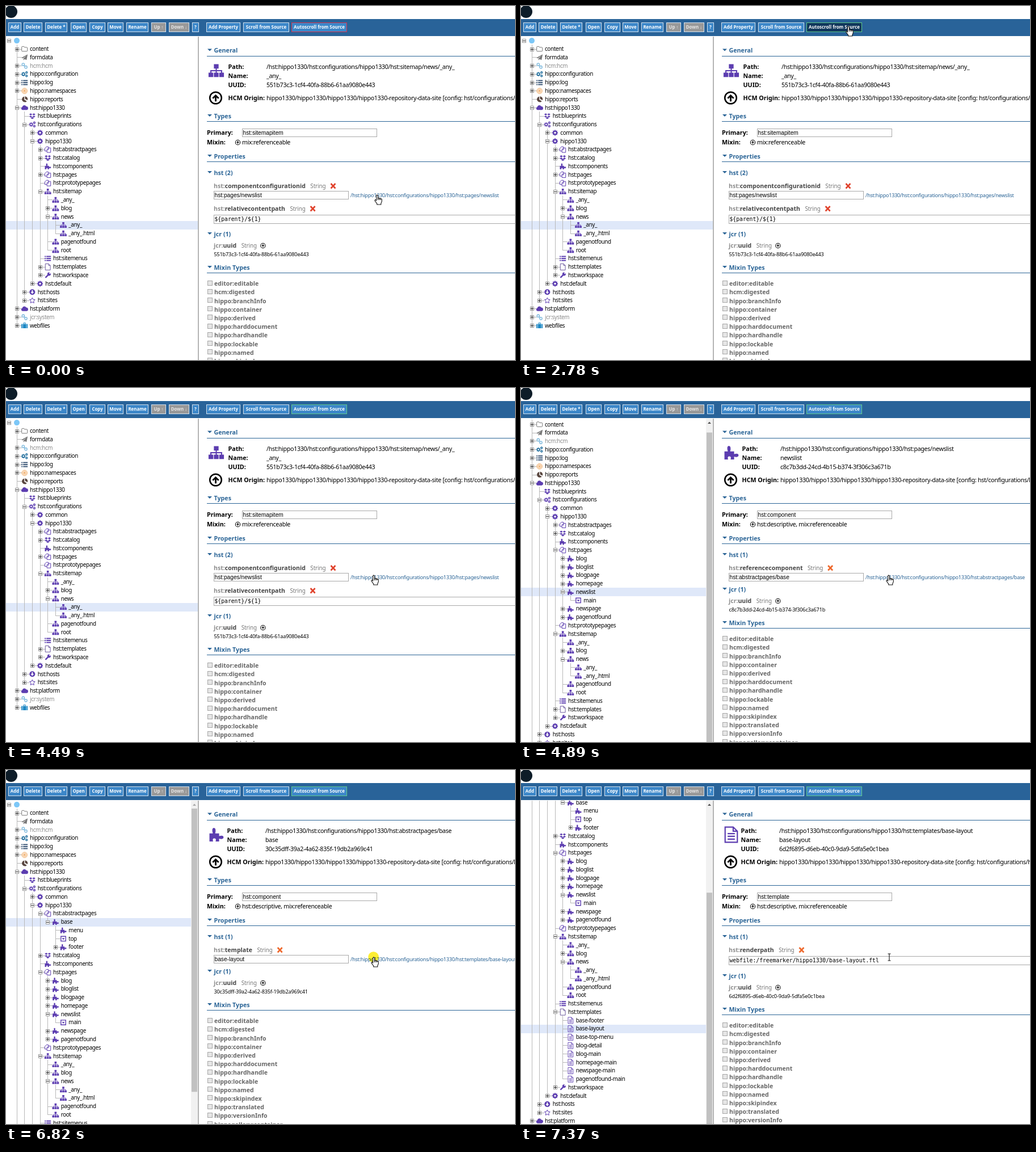
Write an HTML page with a canvas that moves like this. It is 897 by 624 pixels and loops after 8 s.

```html
<!DOCTYPE html>
<html lang="en">
<head>
<meta charset="utf-8">
<title>Repository console</title>
<style>
html, body { margin: 0; width: 100%; height: 100%; overflow: hidden; background: #fff; }
canvas { display: block; }
</style>
</head>
<body>
<canvas id="stage" width="897" height="624"></canvas>
<script>
const ctx = document.getElementById('stage').getContext('2d');
const LOOP = 8000;
const LOADS = [4720, 5960, 7060];
const NAVY = '#2a6496', PURPLE = '#5c3db0';

// [font, letter spacing]
const SANS = '"Noto Sans", "Open Sans", sans-serif';
const FONT = {
  tree: [`9.9px ${SANS}`, -.37],
  body: [`10.65px ${SANS}`, -.3],
  label: [`bold 10.7px ${SANS}`, 0],
  prop: [`bold 10.55px ${SANS}`, 0],
  type: [`9.9px ${SANS}`, -.1],
  link: [`9.1px ${SANS}`, -.25],
  uuid: [`9.1px ${SANS}`, -.16],
  button: [`bold 7.9px ${SANS}`, 0],
  input: ['10.2px "Liberation Sans", Arial, sans-serif', 0],
  mono: ['9.72px "DejaVu Sans Mono", monospace', 0]
};

const TREE = `
0 root - .
1 folder + content
1 plane . formdata
1 chain + hcm:hcm
1 cogs + hippo:configuration
1 bars + hippo:log
1 target + hippo:namespaces
1 pie . hippo:reports
1 cloud - hst:hippo1330
2 boxes . hst:blueprints
2 gears - hst:configurations
3 gear + common
3 gear - hippo1330
4 copy 2 hst:abstractpages
5 puzzle - base
6 puzzle . menu
6 caret . top
6 puzzle + footer
4 boxes + hst:catalog
4 puzzle . hst:components
4 copy 1 hst:pages
5 puzzle + blog
5 puzzle + bloglist
5 puzzle + blogpage
5 puzzle + homepage
5 puzzle - newslist
6 caret . main
5 puzzle + newspage
5 puzzle + pagenotfound
4 copy . hst:prototypepages
4 sitemap - hst:sitemap
5 sitemap . _any_
5 sitemap + blog
5 sitemap - news
6 sitemap . _any_
6 sitemap . _any_.html
5 sitemap . pagenotfound
5 sitemap . root
4 list . hst:sitemenus
4 page 3 hst:templates
5 doc . base-footer
5 doc . base-layout
5 doc . base-top-menu
5 doc . blog-detail
5 doc . blog-main
5 doc . homepage-main
5 doc . newspage-main
5 doc . pagenotfound-main
4 wrench + hst:workspace
3 gear + hst:default
2 down + hst:hosts
2 star + hst:sites
1 cloud + hst:platform
1 chain + jcr:system
1 case + webfiles`.trim().split('\n').map(line => {
  const [depth, icon, mark, name] = line.split(' ');
  return { depth: +depth, icon, mark, name };
});

const BASE = '/hst:hippo1330/hst:configurations/hippo1330/hst:';
const PANELS = [
  { icon: 'sitemap', x: 459, path: 'sitemap/news/_any_', name: '_any_', select: '6_any_',
    uuid: '551b73c3-1cf4-40fa-88b6-61aa9080e443', primary: 'sitemapitem', shift: 0, cross: '#e0432d',
    props: [['componentconfigurationid', 'hst:pages/newslist', 'pages/newslist'],
            ['relativecontentpath', '${parent}/${1}']] },
  { icon: 'puzzle', x: 457, path: 'pages/newslist', name: 'newslist', select: '5newslist',
    uuid: 'c8c7b3dd-24cd-4b15-b374-3f306c3a671b', primary: 'component', shift: -47,
    props: [['referencecomponent', 'hst:abstractpages/base', 'abstractpages/base']] },
  { icon: 'puzzle', x: 457, path: 'abstractpages/base', name: 'base', select: '5base',
    uuid: '30c35dff-39a2-4a62-835f-19db2a969c41', primary: 'component', shift: -47,
    props: [['template', 'base-layout', 'templates/base-layout']] },
  { icon: 'doc', x: 455, path: 'templates/base-layout', name: 'base-layout', select: '5base-layout',
    uuid: '6d2f6895-d6eb-40c0-9da9-5dfa5e0c1bea', primary: 'template', shift: -39,
    props: [['renderpath', 'webfile:/freemarker/hippo1330/base-layout.ftl']] }
];
const MIXINS = ['editor:editable', 'hcm:digested', ...['branchInfo', 'container', 'derived',
  'harddocument', 'hardhandle', 'lockable', 'named', 'skipindex', 'translated', 'versionInfo']
  .map(n => 'hippo:' + n), 'hippogallery:container'];

const BUTTONS = [['Add', 5, 27], ['Delete', 32, 64], ['Delete *', 70, 108], ['Open', 115, 142],
  ['Copy', 148, 175], ['Move', 180, 207], ['Rename', 213, 251], ['Up ↑', 257, 282],
  ['Down ↓', 288, 323], ['?', 329, 340], ['Add Property', 354, 413],
  ['Scroll from Source', 419, 499], ['Autoscroll from Source', 504, 601]];

const ring = (x, y, r) => `M${x - r} ${y}a${r} ${r} 0 1 0 ${2 * r} 0a${r} ${r} 0 1 0 ${-2 * r} 0`;
const cog = (x, y, r) => {
  const d = r * .7;
  return `M${x - r} ${y}h${2 * r}M${x} ${y - r}v${2 * r}M${x - d} ${y - d}l${2 * d} ${2 * d}M${x - d} ${y + d}l${2 * d} ${-2 * d}`;
};
const GEARS = [ring(-2, 0, 2.9) + ring(3.6, -3, 1.6) + ring(3.6, 3, 1.6),
  cog(-2, 0, 3.9) + cog(3.6, -3, 2.2) + cog(3.6, 3, 2.2), 1.1,
  ring(-2, 0, 1.4) + ring(3.6, -3, .8) + ring(3.6, 3, .8)];
const ROWS = 'M-5.5-4.5h2v2h-2zM-2.5-4.5h8v2h-8zM-5.5-1h2v2h-2zM-2.5-1h8v2h-8zM-5.5 2.5h2v2h-2zM-2.5 2.5h8v2h-8z';
const SHEET = 'M-4.4-5.5H1.4L4.4-2.5V5.5H-4.4ZM1.4-5.5V-2.5H4.4';

// [colour, fill, stroke, line width, cut-out]
const ICONS = {
  root: ['#7cc7f7', ring(0, 0, 5)],
  folder: ['#777', '', 'M-5-3.5Q-5-4.5-4-4.5H-1L0-3H4Q5-3 5-2V3Q5 4 4 4H-4Q-5 4-5 3Z', 1],
  plane: ['#777', 'M5.5-5.5 3.5 4.5 0 2.8-1.6 5.2-2 2 3.5-3.5-3 1.5-5.5.5Z'],
  chain: ['#7db9dd', '', ring(-2.3, -2.3, 2.2) + ring(2.3, 2.3, 2.2) + 'M-1.4-1.4 1.4 1.4', 1.4],
  cogs: ['#1d6c9c', ...GEARS],
  gears: [PURPLE, ...GEARS],
  gear: [PURPLE, ring(0, 0, 3.8), cog(0, 0, 5), 2, ring(0, 0, 1.7)],
  bars: ['#3d5878', ROWS],
  list: [PURPLE, ROWS],
  target: ['#f0a860', ring(0, 0, 1.6), ring(0, 0, 3) + ring(0, 0, 4.8), 1],
  pie: ['#59463f', 'M-.5.5V-5A5 5 0 1 0 4 3.4ZM.8-.7V-5.3A5 5 0 0 1 5.2 1.6Z'],
  cloud: [PURPLE, 'M-3.6 4A2.7 2.7 0 0 1-4-1.2 3.7 3.7 0 0 1 3-2.2 3.1 3.1 0 0 1 3.4 4Z'],
  boxes: [PURPLE, 'M-2.8-4.8 0-3-2.8-1.2-5.5-3ZM2.8-4.8 5.5-3 2.8-1.2 0-3ZM-2.8-.8 0 1-2.8 2.5-5.5.8ZM2.8-.8 5.5.8 2.8 2.5 0 1ZM0 1.7 3 3.4 0 5.2-3 3.4Z'],
  copy: [PURPLE, '', 'M-1.5 2.5H-5.2V-2.2L-2.5-5H1V-3M-1.5-.3 1.2-3H5V5H-1.5ZM1.5-3V0H-1.5', 1],
  puzzle: [PURPLE, 'M-5.2-1H-2.6Q-3.8-5-1.8-5.2 .2-5-.8-1H2.2V1.1Q5.5 0 5.6 2 5.5 4 2.2 3V5.2H-.5Q.3 2.8-1.5 2.8-3.2 2.8-2.4 5.2H-5.2Z'],
  caret: [PURPLE, 'M-2.4-1.2H2.4L0 2Z', 'M-4.2-4.2H4.2V4.2H-4.2Z', 1.4],
  sitemap: [PURPLE, 'M-1.8-5h3.6v3.4h-3.6zM-5.9 1.5h3.6v3.4h-3.6zM-1.8 1.5h3.6v3.4h-3.6zM2.3 1.5h3.6v3.4h-3.6z',
    'M0-2V2M-4.1 2V0H4.1V2', .9],
  page: ['#6c5a9e', '', SHEET, 1],
  doc: [PURPLE, '', SHEET + 'M-2.6-.8H2.6M-2.6 1.2H2.6M-2.6 3.2H2.6', .9],
  wrench: [PURPLE, ring(2.2, -2.2, 3), 'M-4.2 4.2 1.5-1.5', 2.4, 'M2-2.2 3.6-5.8 5.8-3.6Z'],
  down: [PURPLE, ring(0, 0, 5), '', 0, 'M-1-3.2H1V0H3L0 3.4-3 0H-1Z'],
  star: [PURPLE, '', 'M0-4.8 1.5-1.7 4.8-1.3 2.4 1.1 3 4.5 0 2.9-3 4.5-2.4 1.1-4.8-1.3-1.5-1.7Z', 1],
  case: ['#1b87c4', 'M-5.5-2.8h1.8v7.5h-1.8zM-3-2.8h6v7.5h-6zM3.7-2.8h1.8v7.5h-1.8z', 'M-1.7-3V-4.6H1.7V-3', 1],
  up: ['#000', 'M-2.9-.1 0-3 2.9-.1 2 .8.7-.5V3H-.7V-.5L-2 .8Z', ring(0, 0, 4.9), 1.2]
};
for (const icon of Object.values(ICONS))
  for (const i of [1, 2, 4]) if (icon[i]) icon[i] = new Path2D(icon[i]);

const POINTERS = {
  hand: new Path2D('M-1.4 1.2Q0-.9 1.4 1.2V5.8Q2.6 4.9 3.8 6.2 5 5.4 6 6.7 7.6 6.1 8.3 7.8V11.5L6.8 15V17H-.2V15.4L-4 10.3Q-4.2 8.2-2.6 8.6L-1.4 9.8Z'),
  arrow: new Path2D('M0 0V14.5L3.3 11.3 5.6 16.6 7.8 15.7 5.5 10.5H10Z'),
  beam: new Path2D('M-2.5-6H2.5M0-6V6M-2.5 6H2.5')
};
// [from, to, x, y]
const MOVES = [[20, 140, 651, 333], [300, 370, 650, 333], [1480, 2080, 578.5, 29],
  [2260, 2400, 577, 36], [3100, 3790, 646, 320], [3880, 4020, 648, 323], [4110, 4170, 648, 330]];
const CLICKS = [[2630, 2780], [4400, 4490], [5660, 5810], [6820, 6910]];

const ease = (t, a, b) => {
  const k = Math.min(1, Math.max(0, (t - a) / (b - a)));
  return .5 - Math.cos(k * Math.PI) / 2;
};

// Draws text centred on y and returns its right edge.
function text(str, x, y, style, color = '#000', align = 'left') {
  [ctx.font, ctx.letterSpacing] = [FONT[style][0], FONT[style][1] + 'px'];
  ctx.textAlign = align;
  ctx.fillStyle = color;
  ctx.fillText(str, x, y + 3.6);
  return x + ctx.measureText(str).width;
}
function rect(x, y, w, h, fill, stroke) {
  ctx.fillStyle = fill;
  ctx.fillRect(x, y, w, h);
  if (!stroke) return;
  ctx.strokeStyle = stroke;
  ctx.lineWidth = 1;
  ctx.strokeRect(x + .5, y + .5, w - 1, h - 1);
}
function poly(color, ...pts) {
  ctx.fillStyle = color;
  ctx.beginPath();
  for (let i = 0; i < pts.length; i += 2) ctx.lineTo(pts[i], pts[i + 1]);
  ctx.fill();
}
function icon(name, x, y, scale = 1) {
  const [color, fill, stroke, width, cut] = ICONS[name];
  ctx.save();
  ctx.translate(x, y);
  ctx.scale(scale, scale);
  ctx.fillStyle = ctx.strokeStyle = color;
  ctx.lineWidth = width || 1;
  if (fill) ctx.fill(fill);
  if (stroke) ctx.stroke(stroke);
  ctx.fillStyle = '#fff';
  if (cut) ctx.fill(cut);
  ctx.restore();
}

function header(t) {
  ctx.fillStyle = '#0d1c28';
  ctx.beginPath();
  ctx.arc(9, 10, 11, 0, 7);
  ctx.fill();
  rect(0, 23, 897, 30, '#296399');
  BUTTONS.forEach(([name, a, b], i) => {
    const auto = i === 12, off = i === 7 || i === 8;
    const focus = auto && t >= 2630 && t < 4400;
    const edge = !auto ? '#d6e4f0' : t < 2780 ? '#d9344a' : '#5fc98a';
    rect(a - 1, 29, b - a + 1, 17, focus ? '#10375c' : off ? '#999' : '#3c87c9', edge);
    text(name, (a + b) / 2 - .5, 36.7, 'button', off ? '#e6e6e6' : '#fff', 'center');
  });
}

function visibleRows(state) {
  let limit = 9;
  return TREE.filter(n => {
    if (n.depth > limit) return false;
    const open = n.mark === '-' || +n.mark <= state;
    n.open = open;
    limit = open || n.mark === '.' ? 9 : n.depth;
    return true;
  });
}

function tree(state, scroll) {
  const rows = visibleRows(state), right = state ? 326 : 338;
  const rowY = i => 60.8 + 14.77 * i - scroll;
  const col = d => 5 + 13.67 * d;
  ctx.save();
  ctx.beginPath();
  ctx.rect(0, 54, right, 570);
  ctx.clip();
  const parents = [];
  rows.forEach((n, i) => {
    const y = Math.round(rowY(i)), x = Math.round(col(n.depth));
    parents[n.depth] = y;
    if (n.depth + n.name === PANELS[state].select) rect(0, y - 7, right, 15, '#dfe8f9');
    if (!n.depth) return;
    const top = parents[n.depth - 1] + 7;
    rect(x, top, 1, y - top, '#b8b8b8');
    rect(x, y, 9, 1, '#b8b8b8');
  });
  rows.forEach((n, i) => {
    const y = rowY(i), x = Math.round(col(n.depth)), by = Math.round(y);
    if (n.mark !== '.') {
      rect(x - 3, by - 3, 7, 7, '#fff', '#999');
      rect(x - 2, by, 5, 1, '#222');
      if (!n.open) rect(x, by - 2, 1, 5, '#222');
    }
    icon(n.icon, 19 + 13.67 * n.depth, y + .3);
    if (n.depth) text(n.name, 28.3 + 13.67 * n.depth, y, 'tree', n.icon === 'chain' ? '#8a8a8a' : '#000');
  });
  ctx.restore();
  if (state) {
    const total = rows.length * 14.77, k = 572 / total;
    rect(326, 54, 12, 570, '#f1f1f1');
    rect(327, 68 + scroll * k, 10, 606 * k, '#c1c1c1');
    poly(scroll ? '#505050' : '#a8a8a8', 329, 63, 332, 59.5, 335, 63);
  }
  rect(338, 54, 2, 570, '#b4b4b4');
}

function heading(str, y, line) {
  poly(NAVY, 355, y - 3, 363, y - 3, 359, y + 1);
  text(str, 366.5, y, 'label', NAVY);
  if (line) rect(354, Math.round(y + 9), 543, 1, NAVY);
}
function field(x, y, w, h, value, style) {
  rect(x, y, w, h, '#fff', '#a9a9a9');
  text(value, x + 1.5, y + h / 2 - .2, style);
}
function propLabel(ns, name, y) {
  const x = text(ns, 366, y, 'prop', '#8c8c8c');
  return text('String', text(name, x, y, 'prop', '#444') + 8.5, y, 'type', '#777');
}
function cross(x, y, color) {
  ctx.strokeStyle = color;
  ctx.lineWidth = 2.6;
  ctx.stroke(new Path2D(`M${x - 4} ${y - 4}l8 8.5m0-8.5l-8 8.5`));
}

function panel(state) {
  const p = PANELS[state];
  heading('General', 78.5, true);
  icon(p.icon, 370.5, 114, state === 3 ? 2.45 : 2.3);
  [['Path:', BASE + p.path], ['Name:', p.name], ['UUID:', p.uuid]].forEach(([label, value], i) => {
    text(label, p.x - 67.5, 107.5 + 16 * i, 'label');
    text(value, p.x, 107.5 + 16 * i, 'body');
  });
  icon('up', 369.5, 162, 2.1);
  text('HCM Origin:', p.x - 67.5, 162, 'label');
  text('hippo1330/hippo1330/hippo1330/hippo1330-repository-data-site [config: hst/configurations/hippo1330]', p.x, 162, 'body');

  heading('Types', 194, true);
  text('Primary:', 354, 223.5, 'label');
  field(416, 216, 238, 15, 'hst:' + p.primary, 'input');
  text('Mixin:', 354, 240.5, 'label');
  icon('up', 408.5, 240.5, .85);
  text((state ? 'hst:descriptive, ' : '') + 'mix:referenceable', 416, 240.5, 'body');

  heading('Properties', 265, true);
  heading(`hst (${p.props.length})`, 294);
  p.props.forEach(([name, value, link], i) => {
    const y = 317 + 40 * i;
    cross(propLabel('hst:', name, y) + 13, y, p.cross || '#ee682c');
    if (link) {
      field(366, y + 9, 238, 15, value, 'input');
      text(BASE + link, 607, y + 16.5, 'link', NAVY);
    } else field(366, y + 11, 540, 16, value, 'mono');
  });

  const s = p.shift;
  heading('jcr (1)', 402 + s, false);
  icon('up', propLabel('jcr:', 'uuid', 422.5 + s) + 11, 422.5 + s, .85);
  text(p.uuid, 366.5, 437.3 + s, 'uuid');
  heading('Mixin Types', 461 + s, true);
  MIXINS.forEach((name, i) => {
    const y = 489.5 + s + 15.2 * i;
    rect(355, Math.round(y) - 6, 9, 9, '#e6e6e6', '#a6a6a6');
    text(name, 367, y, 'prop', '#666');
  });
}

function pointer(t, state) {
  let x = 654, y = 333;
  for (const [a, b, tx, ty] of MOVES) {
    const k = ease(t, a, b);
    x += (tx - x) * k;
    y += (ty - y) * k;
  }
  if (CLICKS.some(([a, b]) => t >= a && t < b)) {
    ctx.globalCompositeOperation = t < 2780 ? 'source-over' : 'multiply';
    ctx.globalAlpha = t < 2780 ? .75 : 1;
    ctx.fillStyle = '#fdee35';
    ctx.beginPath();
    ctx.arc(x - .4, y - .4, 9.4, 0, 7);
    ctx.fill();
    ctx.globalCompositeOperation = 'source-over';
    ctx.globalAlpha = 1;
  }
  const onLink = y >= 328 && y <= 340, onButton = y >= 29 && y <= 45;
  const kind = state === 3 ? 'beam' : onLink || onButton ? 'hand' : 'arrow';
  ctx.save();
  ctx.translate(kind === 'beam' ? x + 1 : x, y);
  ctx.lineWidth = 1.1;
  ctx.strokeStyle = '#111';
  ctx.fillStyle = '#fff';
  ctx.fill(POINTERS[kind]);
  ctx.stroke(POINTERS[kind]);
  if (kind === 'hand') ctx.stroke(new Path2D('M1.4 5.8V9M3.8 6.2V9M6 6.7V9'));
  ctx.restore();
}

function draw(t) {
  const state = LOADS.filter(at => t >= at).length;
  const scroll = [0, 23 * ease(t, 4750, 5030), t < 6050 ? 23 : 0, 210.5 * ease(t, 7080, 7370)][state];
  rect(0, 0, 897, 624, '#fff');
  header(t);
  tree(state, scroll);
  panel(state);
  pointer(t, state);
}

const start = performance.now();
function tick() {
  draw((performance.now() - start) % LOOP);
  requestAnimationFrame(tick);
}
tick();
</script>
</body>
</html>
```
